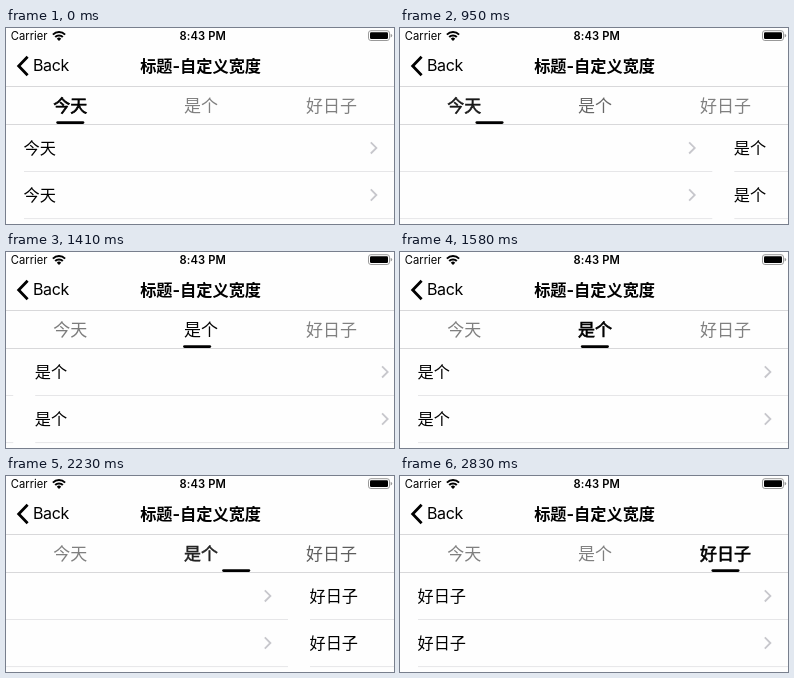
These frames come from a looping animation (388x196 px, 3.85 s). An HTML page:

```html
<!DOCTYPE html>
<html lang="zh-CN">
<head>
<meta charset="utf-8">
<title>标题-自定义宽度</title>
<style>
html, body { margin: 0; width: 100%; height: 100%; overflow: hidden; background: #fefefe; }
svg { display: block; width: 388px; height: 196px; }
text { font-family: Inter, "Noto Sans CJK SC", "Noto Sans CJK", sans-serif; fill: #000; }
.status { font-size: 11.2px; }
.tab { font-size: 17px; text-anchor: middle; }
.cell { font-size: 16.2px; }
.title { font-size: 16.2px; font-weight: 700; text-anchor: middle; }
.rule { stroke: #e6e6e8; }
.edge { stroke: #d8d8da; }
.arrow { fill: none; stroke: #c7c7cc; stroke-width: 1.8; }
</style>
</head>
<body>
<svg viewBox="0 0 388 196">
  <text class="status" x="4.8" y="11.8">Carrier</text>
  <g fill="none" stroke="#000" stroke-width="2">
    <path d="M46.9 6.6A8.6 8.6 0 0 1 59.1 6.6"/>
    <path d="M49.2 9A5.3 5.3 0 0 1 56.8 9"/>
  </g>
  <path d="M53 13L50.8 10.7A3.1 3.1 0 0 1 55.2 10.7Z"/>
  <text class="status" x="196.8" y="11.8" text-anchor="middle" font-weight="600" letter-spacing=".12">8:43 PM</text>
  <rect x="362.5" y="2.7" width="21" height="9.8" rx="2.4" fill="none" stroke="#999"/>
  <rect x="364" y="4.2" width="18" height="6.8" rx="1.2"/>
  <path d="M384.6 5.8q1.6 .4 1.6 1.8t-1.6 1.8z" fill="#999"/>

  <path d="M21.6 28.8L12.7 38L21.6 47.2" fill="none" stroke="#000" stroke-width="2.8"/>
  <text x="27" y="43.4" font-size="16" letter-spacing="-.35">Back</text>
  <text class="title" x="194.6" y="43.8">标题-自定义宽度</text>
  <path class="edge" d="M0 58.5H388"/>

  <g id="tabs"></g>
  <path class="edge" d="M0 96.5H388"/>
  <rect id="bar" y="93.2" width="28.1" height="2.8" rx="1.4"/>
  <g id="pages"></g>
</svg>
<script>
const WIDTH = 388, GAP = 4, PITCH = WIDTH + GAP;
const LOOP = 3850, GRAY = 128, HELD = 106, BOLD = 0.65;
const labels = ['今天', '是个', '好日子'];
const centerOf = page => 64.3 + 130.6 * page;

// Times in ms; lead is how long the spring has run at the first release step
const swipes = [
  { drag: 830, hold: 1010, release: 1210, settle: 1580, from: 15, lead: 59 },
  { drag: 2060, hold: 2230, release: 2490, settle: 2830, from: 0.5, lead: 35 }
];

const $ = id => document.getElementById(id);

// Index of the current screen refresh between two times
const stepAt = (t, a, b, last) =>
  Math.min(last, Math.floor((t - a) / (b - a) * last + 0.23));

// Critically damped spring: share of the distance still to go
const spring = ms => {
  const x = ms * 0.0186;
  return (1 + x) * Math.exp(-x);
};

function travel(s, t) {
  if (t < s.drag) return 0;
  if (t < s.release) {
    const k = stepAt(t, s.drag, s.hold, 3) / 3;
    return s.from + (HELD - s.from) * k;
  }
  const k = stepAt(t, s.release, s.settle, 7) / 7;
  if (k === 1) return PITCH;
  return PITCH - (PITCH - HELD) * spring(s.lead + k * (s.settle - s.release));
}

const row = (s, y) => `
  <text class="cell" x="17.5" y="${y + 29.4}">${s}</text>
  <path class="arrow" d="M364.8 ${y + 17.8}L370.4 ${y + 23.4}L364.8 ${y + 29}"/>
  <path class="rule" d="M18 ${y + 47}H${WIDTH}"/>`;

$('tabs').innerHTML = labels.map((s, i) =>
  `<text class="tab" x="${centerOf(i)}" y="83.9">${s}</text>`).join('');
$('pages').innerHTML = labels.map((s, i) =>
  `<g transform="translate(${i * PITCH})">${row(s, 96.5)}${row(s, 143.6)}</g>`).join('');

const tabs = [...$('tabs').children];

function draw(t) {
  const moved = swipes.map(s => travel(s, t));
  const x = moved[0] + moved[1];
  const page = x / PITCH;
  const selected = moved.filter(m => m === PITCH).length;

  $('pages').setAttribute('transform', `translate(${-x})`);
  $('bar').setAttribute('x', centerOf(page) - 14.05);
  tabs.forEach((tab, i) => {
    const away = Math.min(1, Math.abs(page - i));
    const c = Math.round(GRAY * away);
    tab.style.fill = tab.style.stroke = `rgb(${c},${c},${c})`;
    // The new label only turns bold once its page has settled
    tab.style.strokeWidth = i === selected ? BOLD * (1 - away) : 0;
  });
}

const start = performance.now();
function tick() {
  draw((performance.now() - start) % LOOP);
  requestAnimationFrame(tick);
}
tick();
</script>
</body>
</html>
```
